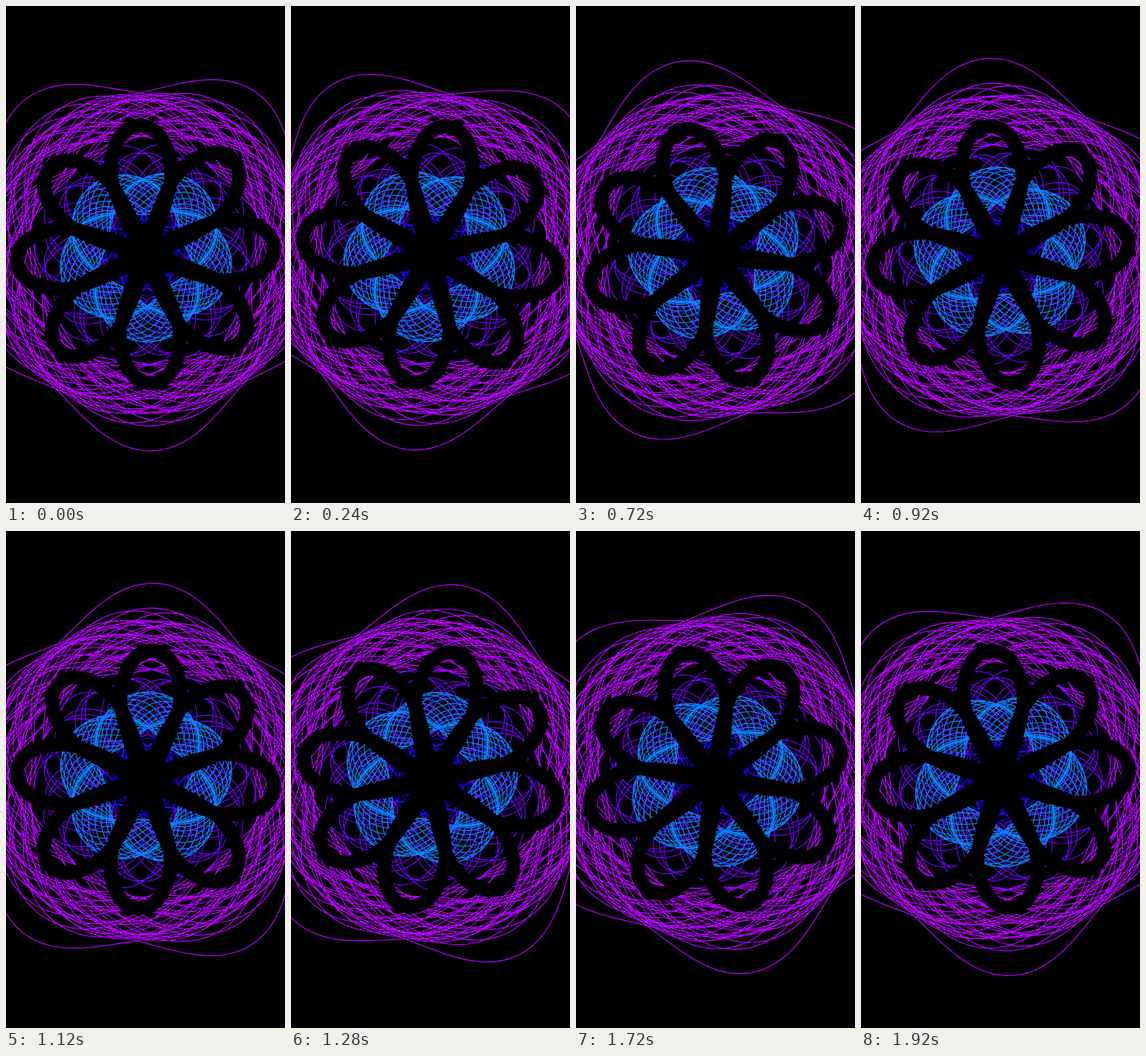
Animation of 360x640 px, one loop 1960 ms. Source, as an HTML page with a canvas:

```html
<!DOCTYPE html>
<html lang="en">
<head>
<meta charset="utf-8">
<title>Spinning flower</title>
<style>
html, body { margin: 0; width: 100%; height: 100%; overflow: hidden; background: #000; }
canvas { display: block; width: 360px; height: 640px; }
</style>
</head>
<body>
<canvas id="stage" width="360" height="640"></canvas>
<script>
const ctx = document.getElementById('stage').getContext('2d');
const LOOP = 1960, STEP = 40, TAU = Math.PI * 2, RAD = Math.PI / 180;

// Closed polar curve that winds several times around the centre.
function polar(turns, radius) {
  const path = new Path2D();
  const n = turns * 150;
  for (let i = 0; i < n; i++) {
    const a = TAU * turns * i / n, r = radius(a);
    path.lineTo(r * Math.cos(a), r * Math.sin(a));
  }
  path.closePath();
  return path;
}

// Sum of waves [amplitude, count]; five-fold symmetric over all turns.
function weave(turns, base, waves) {
  return polar(turns, a =>
    waves.reduce((r, [amp, k]) => r + amp * Math.cos(5 * k * a / turns), base));
}

const lobes = polar(2, a => 203 + 50 * Math.pow((1 + Math.cos(2.5 * a)) / 2, 3.3));

const threads = [
  { color: '#b900ff', path: lobes },
  { color: '#b900ff', path: weave(33, 178, [[26, 17], [9, 4], [8, 29]]) },
  { color: '#7000ff', path: weave(14, 93, [[42, 9], [8, 3]]) },
  { color: '#1400ff', path: weave(11, 32, [[15, 7], [6, 2]]) },
  { color: '#0a84ff', path: weave(23, 82, [[22, 13], [9, 3]]) }
];

const spoke = new Path2D();
spoke.moveTo(0, -12);
spoke.bezierCurveTo(55, -13, 75, -11, 114, -7);
spoke.lineTo(114, 7);
spoke.bezierCurveTo(75, 11, 55, 13, 0, 12);
spoke.closePath();

const petal = new Path2D();
petal.moveTo(92, -38);
petal.bezierCurveTo(125, -42, 166, -30, 166, 0);
petal.bezierCurveTo(166, 30, 125, 42, 92, 38);

function turned(deg, paint) {
  ctx.save();
  ctx.rotate(deg * RAD);
  paint();
  ctx.restore();
}

function draw(p) {
  ctx.setTransform(1, 0, 0, 1, 0, 0);
  ctx.fillStyle = '#000';
  ctx.fillRect(0, 0, 360, 640);
  ctx.translate(180, 320);

  ctx.lineWidth = 1.15;
  turned(88 + 72 * p, () => {
    for (const { color, path } of threads) {
      ctx.strokeStyle = color;
      ctx.stroke(path);
    }
  });

  ctx.strokeStyle = '#000';
  ctx.lineWidth = 18;
  ctx.lineCap = 'round';
  for (let i = 0; i < 8; i++) {
    const deg = 19.5 + 90 * p + 45 * i;
    turned(deg, () => ctx.fill(spoke));
    turned(deg + 22.5, () => ctx.stroke(petal));
  }
}

const start = performance.now();
function tick() {
  const t = (performance.now() - start) % LOOP;
  draw(Math.floor(t / STEP) * STEP / LOOP);
  requestAnimationFrame(tick);
}
tick();
</script>
</body>
</html>
```
